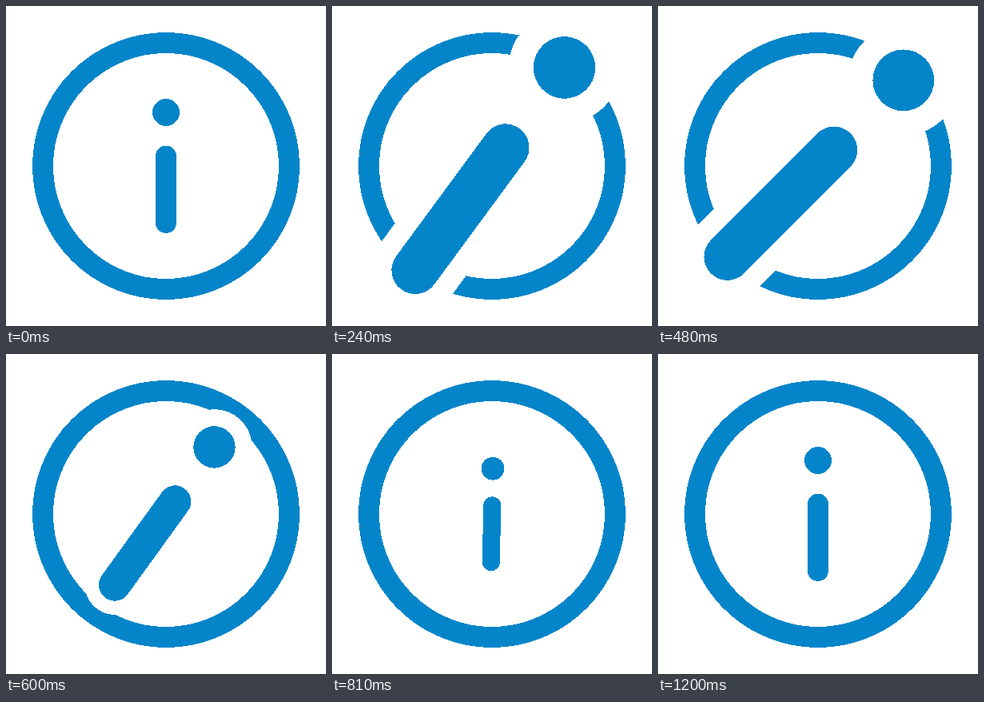
These frames come from a looping animation (400 px wide and 400 px high, 3.23 s). An HTML page without scripts:

```html
<!DOCTYPE html>
<html lang="en">
<head>
<meta charset="utf-8">
<title>Info icon</title>
<style>
  html, body { margin: 0; height: 100%; overflow: hidden; background: #fff; }
  svg { display: block; width: 100%; height: 100%; shape-rendering: crispEdges; }

  .ring { fill: none; stroke: #0485c9; stroke-width: 26; }
  .halo { fill: #fff; stroke: #fff; }
  .mark { fill: #0485c9; stroke: #0485c9; }
  .dot { stroke: none; }
  .bar { stroke-linecap: round; }

  .letter {
    --smooth: cubic-bezier(.333, 0, .667, 1);
    transform-origin: 200px 200px;
    animation: tilt 3230ms var(--smooth) infinite, zoom 3230ms var(--smooth) infinite;
  }

  @keyframes tilt {
    0% { rotate: 0deg; animation-timing-function: cubic-bezier(.37, 0, .15, 1); }
    14.861% { rotate: 44.9deg; }
    29.721% { rotate: -12deg; }
    37.152%, 100% { rotate: 0deg; }
  }

  @keyframes zoom {
    0% { scale: 1; }
    7.43% { scale: 2.28; }
    14.861% { scale: 2.258; }
    22.291% { scale: .84; animation-timing-function: cubic-bezier(.5, 0, .75, 1); }
    37.152%, 100% { scale: 1; }
  }
</style>
</head>
<body>
<svg viewBox="0 0 400 400" role="img" aria-label="Information">
  <circle class="ring" cx="200" cy="200" r="154"/>
  <g class="letter">
    <g class="halo">
      <circle class="dot" cx="200" cy="133" r="30.6"/>
      <path class="bar" d="M200 187.5V271" stroke-width="48.4"/>
    </g>
    <g class="mark">
      <circle class="dot" cx="200" cy="133" r="17"/>
      <path class="bar" d="M200 187.5V271" stroke-width="26"/>
    </g>
  </g>
</svg>
</body>
</html>
```
